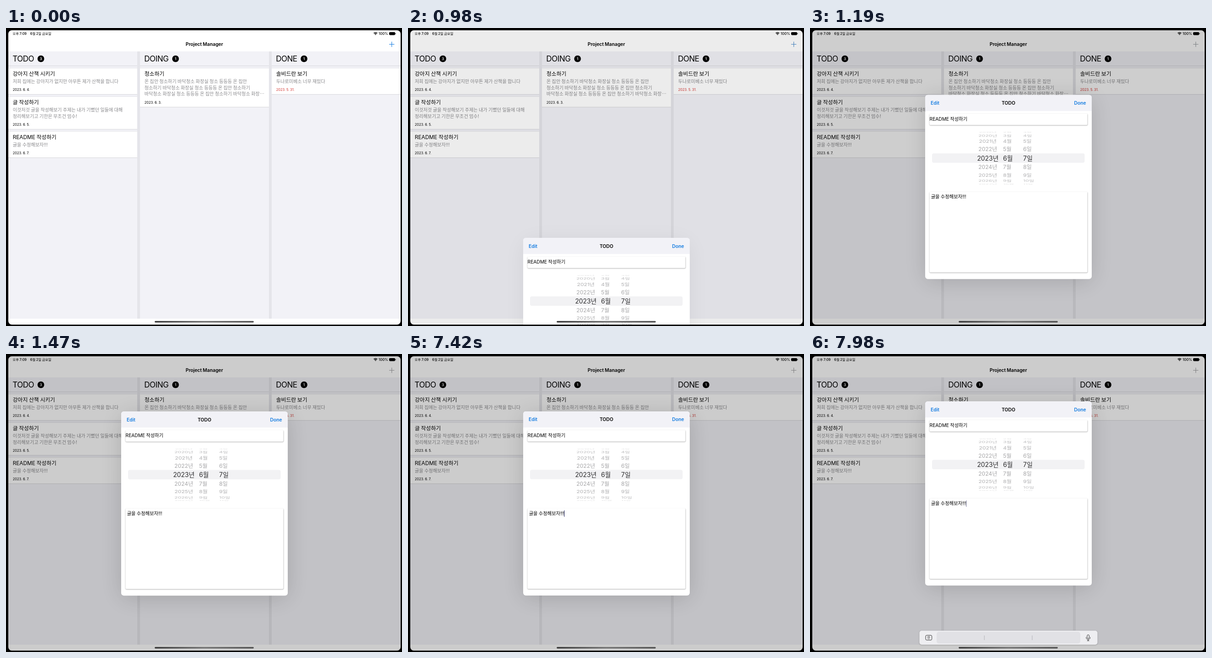
An HTML page that plays this animation: 863 px wide and 649 px high, repeating every 8 s.

```html
<!DOCTYPE html>
<html lang="ko">
<head>
<meta charset="utf-8">
<title>Project Manager</title>
<style>
  html, body { margin: 0; width: 100%; height: 100%; overflow: hidden; background: #000; }
  svg { display: block; }
  text { font-family: Inter, 'Noto Sans CJK KR', 'Noto Sans CJK', sans-serif; word-spacing: -.05em; white-space: pre; }
</style>
</head>
<body>
<svg id="stage" width="863" height="649" viewBox="0 0 863 649">
  <defs>
    <clipPath id="screen"><rect x="5" y="5" width="855" height="641" rx="8"/></clipPath>
    <linearGradient id="homeTone">
      <stop offset="0" stop-color="#3c3c3c"/><stop offset=".5" stop-color="#777"/><stop offset="1" stop-color="#555"/>
    </linearGradient>
  </defs>
  <g clip-path="url(#screen)">
    <g id="board"></g>
    <rect id="dim" width="863" height="649" opacity="0"/>
    <g id="sheet"></g>
    <g id="bar"></g>
    <rect x="324" y="638" width="216" height="3.4" rx="1.7" fill="url(#homeTone)"/>
  </g>
</svg>
<script>
const $ = id => document.getElementById(id);
const BLUE = '#147ce0';

const rect = (x, y, w, h, fill, extra = '') =>
  `<rect x="${x}" y="${y}" width="${w}" height="${h}" fill="${fill}" ${extra}/>`;
const text = (x, y, size, str, fill = '#000', extra = '') =>
  `<text x="${x}" y="${y}" font-size="${size}" fill="${fill}" ${extra}>${str}</text>`;
const BOLD = 'font-weight="600"';
const MID = 'text-anchor="middle"';

const columns = [
  ['TODO', 76, [
    ['강아지 산책 시키기', ['저희 집에는 강아지가 없지만 아무튼 제가 산책을 합니다'], '2023. 6. 4.'],
    ['글 작성하기', ['이것저것 글을 작성해보기 주제는 내가 기뻤던 일들에 대해', '정리해보기고 기한은 무조건 엄수!'], '2023. 6. 5.'],
    ['README 작성하기', ['글을 수정해보자!!!'], '2023. 6. 7.'],
  ]],
  ['DOING', 369.5, [
    ['청소하기', ['온 집안 청소하기 바닥청소 화장실 청소 등등등 온 집안', '청소하기 바닥청소 화장실 청소 등등등 온 집안 청소하기',
      '바닥청소 화장실 청소 등등등 온 집안 청소하기 바닥청소 화장⋯'], '2023. 6. 3.'],
  ]],
  ['DONE', 649.5, [
    ['솔비드란 보기', ['두나로미베소 너무 재밌다'], '2023. 5. 31.', '#d3302b'],
  ]],
];

function card(x, y, [title, lines, date, dateColor]) {
  const h = 43.2 + 13.8 * lines.length;
  return [h, rect(x, y, 281, h, '#fff') + rect(x, y - .5, 281, .8, '#dcdce0') + rect(x, y + h, 281, .9, '#d4d4d8') +
    text(x + 9.7, y + 16.7, 11.8, title) +
    lines.map((line, i) => text(x + 9.7, y + 32.6 + 13.8 * i, 10.12, line, '#8a8a8d')).join('') +
    text(x + 9.7, y + h - 6.9, 7.5, date, dateColor)];
}

function column([name, badgeX, cards], i) {
  const x = 5 + 287 * i;
  let out = rect(x, 51, 281, 582, '#f2f2f7') + rect(x, 82, 281, 1, '#d6d6da') +
    text(x + 9.3, 73, 17, name, '#000', 'letter-spacing="-.5"') +
    `<circle cx="${badgeX}" cy="67" r="7.3"/>` +
    text(badgeX, 69.8, 8, cards.length, '#fff', BOLD + MID);
  let y = 87.2;
  for (const item of cards) {
    const [h, markup] = card(x, y, item);
    out += markup;
    y += h + 5;
  }
  return out;
}

$('board').innerHTML = rect(0, 0, 863, 649, '#fff') + rect(5, 51, 855, 582, '#e5e5ea') +
  text(14.5, 14.8, 7.3, '오후 7:09', '#000', 'font-weight="500"') +
  text(52.8, 14.8, 7.3, '6월 2일 금요일', '#000', 'font-weight="500"') +
  text(812, 14.8, 7.7, '100%', '#000', 'font-weight="500"') +
  `<g fill="none" stroke="#000" stroke-width="1.3">
    <path d="M801.3 11.3Q805.3 7.9 809.3 11.3M802.9 13Q805.3 11 807.7 13"/></g>
  <path d="M804 14.1Q805.3 13.1 806.6 14.1L805.3 15.6Z"/>` +
  rect(835, 9, 13, 6.4, '#000', 'rx="1.8"') + rect(848.5, 11, 1, 2.4, '#000', 'rx=".5"') +
  text(432.3, 39.2, 10.3, 'Project Manager', '#000', BOLD + MID) +
  '<path id="plus" d="M835 35.5h11.4M840.7 29.8v11.4" stroke-width="1.1"/>' +
  columns.map(column).join('');

// Picker wheel: rows 20 degrees apart on a cylinder seen from the front.
function wheel() {
  let out = rect(266, 127.3, 332.5, 20.5, '#f2f2f4', 'rx="4"');
  for (let k = -4; k <= 4; k++) {
    const angle = k * Math.PI / 9, size = k ? 12.1 : 13.8;
    const fill = k ? '#a6a6a8' : '#2c2c2e';
    const alpha = [1, 1, .9, .75, .4][Math.abs(k)];
    out += `<g transform="translate(0 ${138 + 57 * Math.sin(angle)}) scale(1 ${Math.cos(angle)})" opacity="${alpha}">` +
      text(387.5, size * .36, size, `${2023 + k}년`, fill, MID) +
      text(420.8, size * .36, size, `${6 + k}월`, fill) +
      text(464.6, size * .36, size, `${7 + k}일`, fill) + '</g>';
  }
  return out;
}

const field = (y, h) =>
  rect(260.5, y + 1, 344.5, h, '#000', 'rx="2" opacity=".32" style="filter:blur(1.2px)"') +
  rect(260.5, y, 344, h, '#fff', 'rx="2"');

$('sheet').innerHTML =
  rect(251, 6, 363, 401, '#000', 'id="shadow" rx="20" style="filter:blur(23px)"') +
  rect(251, 0, 363, 401, '#fff', 'rx="6"') +
  '<path d="M251 35V6q0-6 6-6h351q6 0 6 6v29z" fill="#f2f2f7"/>' +
  text(263, 21.3, 10.3, 'Edit', BLUE, BOLD + ' id="edit"') +
  text(432.5, 21.3, 10.3, 'TODO', '#000', BOLD + MID) +
  text(601.7, 21.3, 10.3, 'Done', BLUE, BOLD + ' text-anchor="end"') +
  field(40.5, 25) + text(260.6, 56.2, 10.2, 'README 작성하기') +
  wheel() +
  field(211, 175.5) + text(263.7, 225.8, 10.2, '글을 수정해보자!!!') +
  rect(340, 215.5, 1, 14, '#20235c', 'id="caret"');

$('bar').innerHTML =
  rect(238.5, 603, 388, 31, '#000', 'rx="5" opacity=".22" style="filter:blur(1.5px)"') +
  rect(238.5, 602.5, 388, 30.5, '#eeeef1', 'rx="5"') +
  rect(276, 605, 313, 25.5, '#e1e1e5', 'rx="5"') +
  rect(379.5, 613, 1, 10, '#b4b4b8') + rect(483.7, 613, 1, 10, '#b4b4b8') +
  `<g fill="none" stroke="#333" stroke-width="1">
    <rect x="252" y="612.5" width="13.6" height="10.6" rx="2.6"/>
    <rect x="604" y="611.5" width="4.4" height="8" rx="2.2"/>
    <path d="M601.8 616.5v1q0 4 4.4 4t4.4-4v-1M606.2 621.5v3M603.8 624.5h4.8"/></g>` +
  text(258.8, 620.4, 7, '한', '#222', MID);

// Critically damped spring, 0 at rest to 1 at the goal.
function spring(ms) {
  const u = Math.max(0, ms) * .01785;
  return 1 - (1 + u) * Math.exp(-u);
}

const mix = (a, b, p) => Math.round(a + (b - a) * p);

function draw(t) {
  const open = spring(t - 908.3), lift = spring(t - 7420);
  $('sheet').setAttribute('transform', `translate(0 ${649 - 524 * open - 21.7 * lift})`);
  $('dim').setAttribute('opacity', .2 * open);
  $('shadow').setAttribute('opacity', .15 * open);
  $('plus').setAttribute('stroke', `rgb(${mix(20, 160, open)},${mix(124, 160, open)},${mix(224, 162, open)})`);

  const p = Math.min(1, (t - 6300) / 490);
  $('edit').setAttribute('opacity', p < 0 ? 1 : .22 + .78 * p * p * (3 - 2 * p));
  $('caret').setAttribute('opacity', t < 7420 ? 0 : t < 7920 ? 1 : .6);
  $('bar').setAttribute('opacity', lift);
}

const start = performance.now();
let shown = -1;
function tick() {
  const time = Math.max(0, performance.now() - start) % 8000;
  const step = Math.floor(time / 70) * 70;
  if (step !== shown) draw(shown = step);
  requestAnimationFrame(tick);
}
tick();
</script>
</body>
</html>
```
